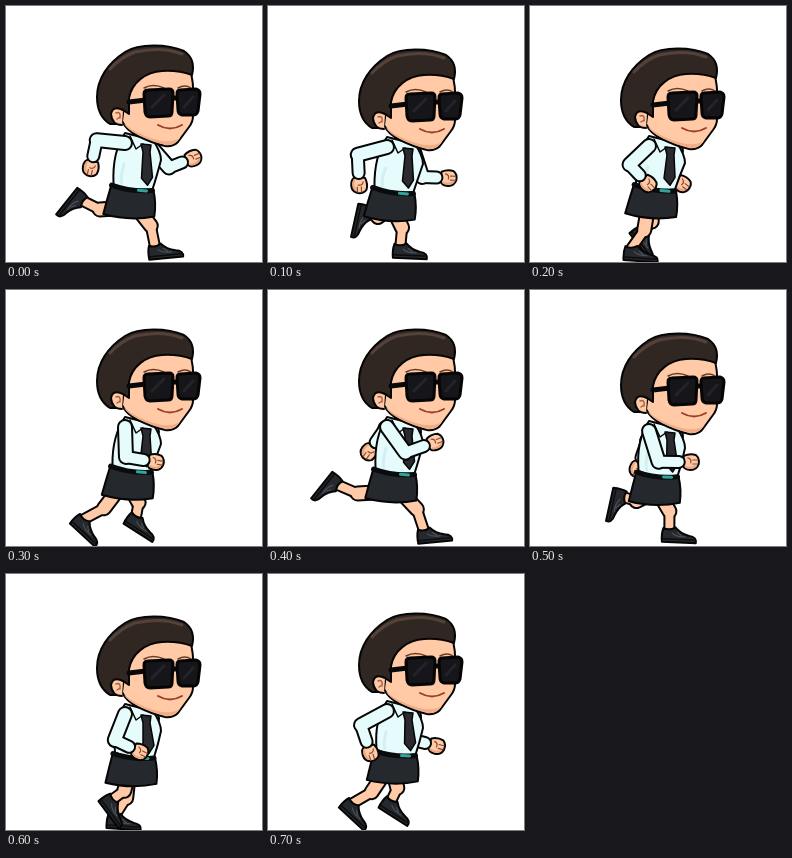
An HTML page that plays this animation: 256x256 px, repeating every 800 ms.

```html
<!DOCTYPE html>
<html lang="en">
<head>
<meta charset="utf-8">
<title>Run cycle</title>
<style>
html, body { margin: 0; width: 100%; height: 100%; overflow: hidden; background: #fff; }
svg { display: block; width: 100vw; height: 100vh; }
</style>
</head>
<body>
<svg id="stage" viewBox="0 0 256 256" stroke-linecap="round" stroke-linejoin="round">
  <g id="body"></g>
  <g id="head" stroke="#050505" stroke-width="2" fill="none">
    <path fill="#ffcaa5" d="M121 78 L138 62 L184 64 Q188 76 187 92 L187 110 Q187 116 183 121 L172 136 Q167 141 159 140 Q146 137 132 130 Q120 124 116 115Z"/>
    <path stroke="none" fill="#f0ad87" d="M118 118 Q131 128 148 133 Q163 138 174 132 Q168 140 160 139 Q146 136 132 129 Q122 124 118 118Z"/>
    <path fill="#312722" d="M104 118 Q91 110 91 91 C91 73 102 57 119 46 C133 37 162 38 178 45 Q190 53 186 69 Q172 64 156 65 C140 66 126 76 123 92 L123 108 L117 104 L110 118Z"/>
    <path stroke="#54423a" stroke-width="3" d="M104 63 Q115 51 129 46 Q156 40 176 48"/>
    <path fill="#ffcaa5" d="M117 104 Q107 99 105 108 Q106 119 116 119"/>
    <path stroke="#a95f43" stroke-width="1.4" d="M110 107 Q115 105 114 112 M111 113 L114 111"/>
    <path stroke="#6b3b28" stroke-width="1.5" d="M138 82 Q147 77 158 82 M172 82 Q179 78 185 82"/>
    <path stroke="#080809" stroke-width="5" d="M123 96 L140 94 M165 92 L174 92"/>
    <path fill="#15151a" stroke-width="3" d="M142 84 L163 83 Q167 83 167 87 L166 106 Q166 110 162 110 L144 111 Q140 111 139 106 L138 88 Q138 84 142 84Z M174 84 L190 83 Q194 84 194 88 L192 105 Q191 109 188 109 L176 109 Q172 108 172 104 L171 88 Q171 84 174 84Z"/>
    <path stroke="#23232a" stroke-width="3" d="M146 101 L158 89 M178 101 L187 91"/>
    <path stroke="#9c3f2a" stroke-width="2" d="M152 119 Q164 126 176 119"/>
  </g>
</svg>
<script>
const INK = '#050505', SKIN = '#ffcaa5', SHIRT = '#e5fbfc', SHADE = '#d2f0f3';
const DARK = '#25282c', STEP = 100, STEPS = 8;

// Sum of cosines: each wave is [amplitude, delay], the nth turning n times a cycle
const swing = (angle, mean, ...waves) =>
  waves.reduce((sum, [size, delay], n) => sum + size * Math.cos((n + 1) * angle - delay), mean);

const footAt = (angle, side) => [
  swing(angle, 110 + 3.5 * side, [35, -0.07], [7, 1.17], [5, 0]),
  swing(angle, 226, [20, 0.55], [-8.4, 0.29], [6.5, 0.31]),
  swing(angle, 45, [-60, 0.49], [18, 0.42], [-14.5, 0.25])
];

const handAt = (angle, side) => [
  swing(angle, 135 + 9 * side, [-43 - side, 0.19]),
  swing(angle, 171.5, [5, 0], [-10.5, 0], [0, 0], [-4, 0])
];

const path = (d, fill, stroke = INK, width = 2) =>
  `<path d="${d}" fill="${fill}" stroke="${stroke}" stroke-width="${width}"/>`;
const line = (a, b, color, width) =>
  path(`M${a[0]} ${a[1]}L${b[0]} ${b[1]}`, 'none', color, width);
const mix = (a, b, k) => [a[0] + (b[0] - a[0]) * k, a[1] + (b[1] - a[1]) * k];

// Point beside the middle of a-b
function joint(a, b, bend) {
  const dx = b[0] - a[0], dy = b[1] - a[1], len = Math.hypot(dx, dy) || 1;
  return [(a[0] + b[0]) / 2 - dy / len * bend, (a[1] + b[1]) / 2 + dx / len * bend];
}

function limb(a, b, c, upper, lower, fill) {
  return line(a, b, INK, upper + 4) + line(b, c, INK, lower + 4) +
    line(a, b, fill, upper) + line(b, c, fill, lower);
}

function fist([x, y], angle) {
  return `<g transform="translate(${x} ${y}) rotate(${angle})">` +
    path('M-7 -6Q-1 -9 5 -7Q9 -4 8 2Q6 8 0 8Q-7 8 -8 3Z', SKIN) +
    path('M-5 5Q0 7 5 4', 'none', '#eda67f', 2) +
    path('M7 -2L2 -2M7 2L2 2M-3 -4Q1 -3 0 1', 'none', '#8d4a34', 1.2) + '</g>';
}

function arm(shoulder, hand, bend) {
  const elbow = joint(shoulder, hand, bend);
  const reach = Math.hypot(hand[0] - elbow[0], hand[1] - elbow[1]) || 1;
  const wrist = mix(elbow, hand, Math.max(0.2, 1 - 12 / reach));
  const angle = Math.atan2(hand[1] - elbow[1], hand[0] - elbow[0]) * 180 / Math.PI;
  return fist(hand, angle) + limb(shoulder, elbow, wrist, 12, 10, SHIRT);
}

function leg([x, y], [footX, footY, turn]) {
  const hip = [122 + x + (footX - 110) / 4, 203 + y], foot = [footX, footY];
  return limb(hip, joint(hip, foot, -5), foot, 12, 8, SKIN) +
    `<g transform="translate(${foot}) rotate(${turn})">` +
    path('M-6 -2Q0 1 6 -3Q11 3 20 5Q28 6 27 12L-7 12Q-8 4 -6 -2Z', DARK) +
    path('M-6 9L25 9', 'none', '#0b0c0e', 1.5) +
    path('M8 2L12 5M3 3Q8 7 16 6', 'none', '#4a5058', 1.2) + '</g>';
}

const atHip = ([x, y], art) =>
  `<g transform="translate(${x} ${y}) rotate(${-x} 126 185)">${art}</g>`;

const skirt = hip => atHip(hip,
  path('M106 179Q126 188 148 185Q151 198 149 211Q124 216 98 209Q102 193 106 179Z', DARK));

const belt = hip => atHip(hip,
  path('M106 180Q126 187 147 185', 'none', '#0a0b0c', 5) +
  path('M133 185L141 185.5', 'none', '#2fa59b', 3));

function shirt(lift, [x, y]) {
  const left = `${108 + x} ${179 + y}`, right = `${147 + x} ${184 + y}`;
  return path(`M119 ${127 + lift}Q106 ${146 + lift} ${left}Q${126 + x} ${187 + y} ${right}` +
      `Q${151 + x} ${172 + y} 155 ${154 + lift}Q155 ${146 + lift} 147 ${134 + lift}Z`, SHIRT) +
    path(`M118 ${158 + lift}Q${115 + x} 170 ${116 + x} ${178 + y}`, 'none', SHADE, 3);
}

const tie = (lift, [x, y]) =>
  path(`M124 ${130 + lift}L130 ${143 + lift}L137 ${138 + lift}`, SHIRT, INK, 1.5) +
  path(`M135 ${138 + lift}L145 ${139 + lift}L144 ${146 + lift}L${147 + x} ${172 + y}` +
    `L${142 + x} ${180 + y}L${136 + x} ${173 + y}L137 ${146 + lift}Z`, '#2b2a2f', INK, 1.5);

const body = document.getElementById('body');
const head = document.getElementById('head');
let shown = -1;

function draw(time) {
  const step = Math.floor(time / STEP) % STEPS;
  if (step === shown) return;
  shown = step;
  const near = step / STEPS * 2 * Math.PI, far = near + Math.PI;
  const lift = Math.round(swing(near, 1.75, [0, 0], [2.5, 2.21]));
  const hip = [-0.5 - 1.5 * Math.sin(near), 2.7 * Math.sin(2 * near) - 0.7];
  body.innerHTML = [
    arm([146, 142 + lift], handAt(far, 1), 15),
    leg(hip, footAt(far, 1)),
    leg(hip, footAt(near, -1)),
    skirt(hip),
    shirt(lift, hip),
    belt(hip),
    tie(lift, hip),
    arm([119, 137 + lift], handAt(near, -1), 19)
  ].join('');
  head.setAttribute('transform', `translate(0 ${lift})`);
}

const start = performance.now();
function tick() {
  draw(performance.now() - start);
  requestAnimationFrame(tick);
}
draw(0);
requestAnimationFrame(tick);
</script>
</body>
</html>
```
